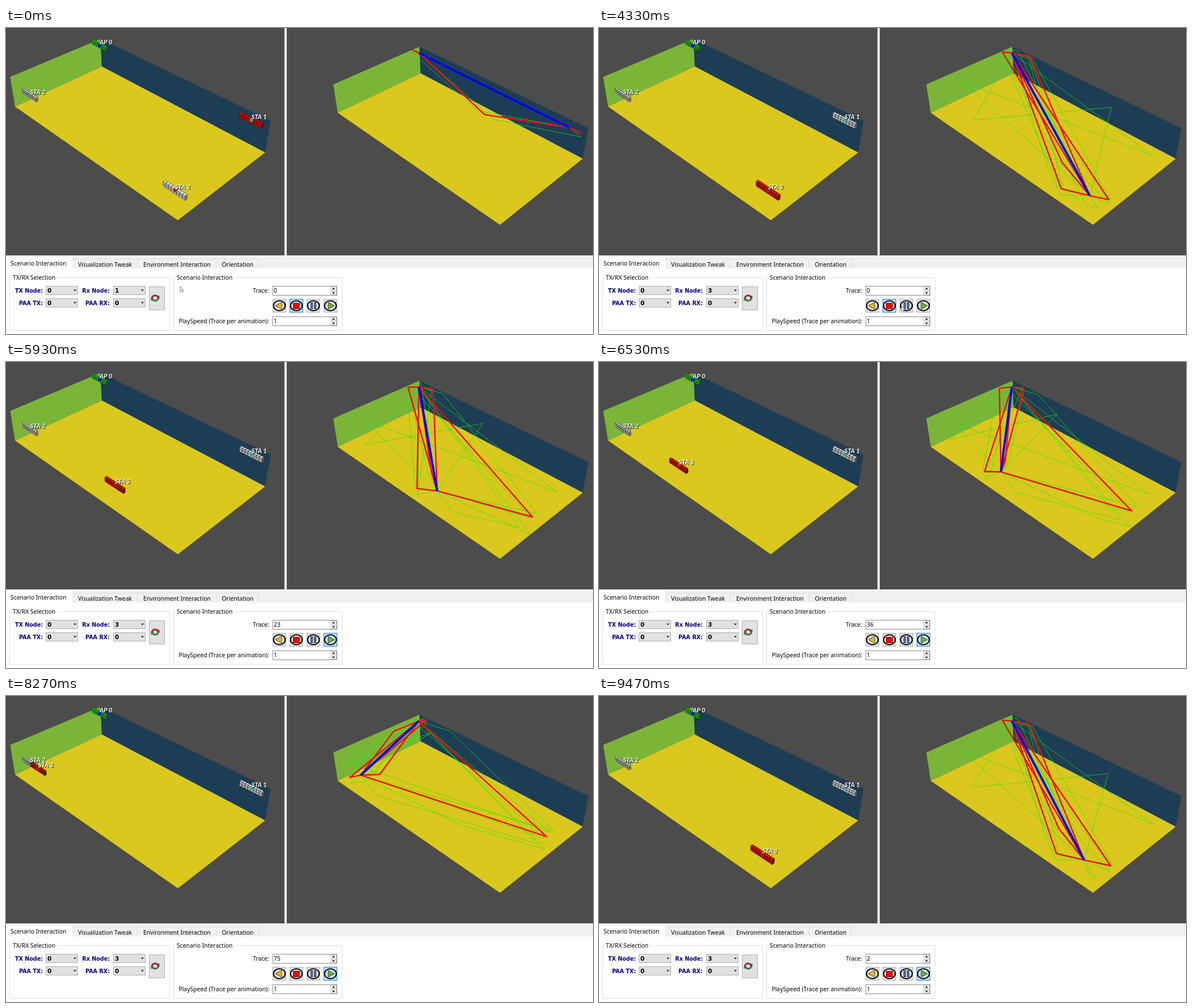
Recreate the animation shown at these times as an HTML page with a canvas. Size 1035x541 px, loop 9540 ms.

```html
<!DOCTYPE html>
<html lang="en">
<head>
<meta charset="utf-8">
<title>Ray tracing scenario viewer</title>
<style>
html, body { margin: 0; width: 100%; height: 100%; overflow: hidden; }
canvas { display: block; }
</style>
</head>
<body>
<canvas id="stage" width="1035" height="541"></canvas>
<script>
const c = document.getElementById('stage').getContext('2d');
const LOOP = 9540;
const UI = '10.4px "Noto Sans", "Open Sans", sans-serif';
const BOLD = 'bold 9.6px "DejaVu Sans", sans-serif';
const VALUE = 'bold 10.5px "DejaVu Sans", sans-serif';

// Perspective of the unit room: u along the blue wall, v along the green wall, w up.
// Rows: x numerator, y numerator, divisor.
const camera = m => p => {
  const [x, y, d] = m.map(r => r[0] + r[1] * p[0] + r[2] * p[1] + r[3] * p[2]);
  return [x / d, y / d];
};
const leftView = camera([[169, 188.31, -154.82, -7.9], [68, 104.01, 55.22, -49.3], [1, -.2181, -.1136, -.033]]);
const rightView = camera([[731, 66.82, -210.36, -26.06], [80, 101.2, 53.5, -48.1], [1, -.2155, -.11, -.033]]);

const AP = [.0485, .0905, .995], STA1 = [.945, .0925, .995], STA2 = [.052, .895, .39];
const LEFT = [0, 0], RIGHT = [0, 1], BACK = [1, 0], FRONT = [1, 1], FLOOR = [2, 0];

const lerp = (a, b, s) => a + (b - a) * s;

// Piecewise linear value from [time, value] pairs
function along(keys, t) {
  if (t <= keys[0][0]) return keys[0][1];
  for (let i = 1; i < keys.length; i++) {
    const [t0, a] = keys[i - 1], [t1, b] = keys[i];
    if (t <= t1) return lerp(a, b, (t - t0) / (t1 - t0));
  }
  return keys[keys.length - 1][1];
}

function shape(points, fill, stroke, width = 1, open) {
  c.beginPath();
  points.forEach(p => c.lineTo(p[0], p[1]));
  if (!open) c.closePath();
  if (fill) { c.fillStyle = fill; c.fill(); }
  if (stroke) { c.strokeStyle = stroke; c.lineWidth = width; c.stroke(); }
}

function box(x0, y0, x1, y1, fill, stroke) {
  if (fill) { c.fillStyle = fill; c.fillRect(x0, y0, x1 - x0, y1 - y0); }
  if (stroke) {
    c.strokeStyle = stroke; c.lineWidth = 1;
    c.strokeRect(x0 + .5, y0 + .5, x1 - x0 - 1, y1 - y0 - 1);
  }
}

function text(s, x, y, font = UI, color = '#000', align = 'left') {
  c.font = font; c.fillStyle = color; c.textAlign = align;
  c.fillText(s, x, y);
}

function room(view) {
  const quad = (pts, color) => shape(pts.map(view), color);
  quad([[0, 0, 0], [0, 1, 0], [0, 1, 1], [0, 0, 1]], '#7bb538');
  quad([[0, 0, 0], [1, 0, 0], [1, 0, 1], [0, 0, 1]], '#1d3d54');
  quad([[0, 0, 0], [1, 0, 0], [1, 1, 0], [0, 1, 0]], '#dac81e');
}

// Antenna array: a block of 8 x 2 elements
function node(pos, [face, top, side], dot) {
  const at = (i, j, d) => leftView([
    pos[0] + (i / 8 - .5) * .105, pos[1] + (d - .5) * .02, pos[2] + (j / 2 - .5) * .135]);
  const cell = (pts, color) => shape(pts.map(p => at(...p)), color, '#111', .5);
  for (let i = 0; i < 8; i++) {
    cell([[i, 2, 0], [i + 1, 2, 0], [i + 1, 2, 1], [i, 2, 1]], top);
    for (let j = 0; j < 2; j++)
      cell([[i, j, 1], [i + 1, j, 1], [i + 1, j + 1, 1], [i, j + 1, 1]], face);
  }
  for (let j = 0; j < 2; j++)
    cell([[8, j, 0], [8, j, 1], [8, j + 1, 1], [8, j + 1, 0]], side);
  if (dot) {
    const [x, y] = leftView(pos);
    shape([[x - 1, y - 4], [x + 3.5, y - 1], [x + 1, y + 4], [x - 3.5, y + 1]], dot);
  }
}

function label(s, pos) {
  const [x, y] = leftView(pos), font = 'italic bold 11px Lato, sans-serif';
  text(s, x + 1, y - 1, font, '#222');
  text(s, x, y - 2, font, '#fff');
}

// Specular path found by mirroring the sender in each plane; null when it misses the room
function reflect(tx, rx, planes) {
  const images = [tx];
  for (const [axis, value] of planes) {
    const p = [...images[images.length - 1]];
    p[axis] = 2 * value - p[axis];
    images.push(p);
  }
  const path = [rx];
  for (let i = planes.length; i > 0; i--) {
    const [axis, value] = planes[i - 1], from = path[0], image = images[i];
    const s = (value - from[axis]) / (image[axis] - from[axis]);
    const hit = from.map((a, n) => lerp(a, image[n], s));
    if (!(s > 0 && s < 1) || hit.some(a => a < -1e-6 || a > 1 + 1e-6)) return null;
    path.unshift(hit);
  }
  return [tx, ...path];
}

function rays(rx, planes) {
  const draw = (list, color, width) => {
    const path = reflect(AP, rx, list);
    if (path) shape(path.map(rightView), null, color, width, true);
  };
  c.lineJoin = 'round';
  for (const a of planes) for (const b of planes) if (a !== b) draw([a, b], 'rgba(20, 240, 10, .7)', 1);
  for (const a of planes) draw([a], '#ff0808', 2.4);
  draw([], '#0000ff', 4);
  c.lineJoin = 'miter';
}

function combo(x, y, value, hot) {
  box(x, y, x + 57, y + 16, hot ? '#e5f1fb' : '#e1e1e1', hot ? '#0078d7' : '#adadad');
  text(value, x + 3, y + 12, VALUE);
  shape([[x + 49, y + 6.5], [x + 54, y + 6.5], [x + 51.5, y + 9.5]], '#222');
}

function spin(y, value) {
  box(470, y, 584, y + 17, '#fff', '#8a8a8a');
  text(value, 472, y + 12);
  for (const [top, tip] of [[y + 1, -1], [y + 9, 1]]) {
    box(572, top, 583, top + 7, '#f0f0f0', '#c4c4c4');
    const mid = top + 3.5;
    shape([[575, mid - tip * 1.5], [580, mid - tip * 1.5], [577.5, mid + tip * 1.8]], '#222');
  }
}

function mediaButton(x, hot, icon) {
  box(x, 479, x + 24, 503, hot ? '#cce4f7' : '#e1e1e1', hot ? '#0078d7' : '#adadad');
  c.beginPath();
  c.ellipse(x + 12, 491, 10.3, 8.8, 0, 0, 7);
  c.strokeStyle = '#000'; c.lineWidth = 2; c.stroke();
  icon(x + 12);
}

function refreshButton() {
  box(252, 457, 280, 499, '#e1e1e1', '#adadad');
  for (const [color, turn] of [['#d01818', 0], ['#2f9e2f', Math.PI]]) {
    c.save();
    c.translate(263, 477.5);
    c.rotate(turn);
    for (const [stroke, width] of [['#222', 2.8], [color, 1.6]]) {
      c.beginPath();
      c.ellipse(0, 0, 5.4, 4.6, 0, Math.PI * 1.02, Math.PI * 1.8);
      c.strokeStyle = stroke; c.lineWidth = width; c.stroke();
    }
    shape([[3, -1], [7, -4.5], [7, 1]], color, '#222', .6);
    c.restore();
  }
}

function tabs() {
  box(0, 402, 1035, 425, '#f0f0f0');
  box(0, 425, 1035, 541, '#fff');
  const names = [['Visualization Tweak', 117, 232], ['Environment Interaction', 232, 371], ['Orientation', 371, 446]];
  for (const [name, x0, x1] of names) {
    box(x0 - 1, 408, x1, 426, '#f0f0f0', '#dedede');
    text(name, (x0 + x1) / 2, 422, UI, '#000', 'center');
  }
  box(0, 425, 1035, 427, '#fff');
  box(0, 405, 117, 427, '#fff');
  text('Scenario Interaction', 8, 420);
}

function group(x0, x1, title) {
  box(x0, 441, x1, 535, null, '#dfdfdf');
  c.font = UI;
  box(x0 + 4, 438, x0 + 9 + c.measureText(title).width, 446, '#fff');
  text(title, x0 + 6, 445);
}

function controls(rx, trace, hover, focus) {
  tabs();
  group(6, 289, 'TX/RX Selection');
  group(295, 593, 'Scenario Interaction');
  const names = [['TX Node:', 65, 468], ['PAA TX:', 65, 490], ['Rx Node:', 183, 468], ['PAA RX:', 183, 490]];
  for (const [s, x, y] of names) text(s, x, y, BOLD, '#000080', 'right');
  combo(70, 456, 0);
  combo(70, 478, 0);
  combo(189, 456, rx, hover === 'rx');
  combo(189, 478, 0);
  refreshButton();
  text('Trace:', 464, 468, UI, '#000', 'right');
  text('PlaySpeed (Trace per animation):', 464, 522, UI, '#000', 'right');
  spin(456, trace);
  spin(510, 1);
  const hot = name => hover === name || focus === name;
  mediaButton(470, false, x => shape([[x - 7, 491], [x + 4, 485], [x + 4, 497]], '#ffb800', '#222', .8));
  mediaButton(500, hot('stop'), x => box(x - 6, 486, x + 6, 497, '#ff0000', '#a00000'));
  mediaButton(530, false, x => {
    box(x - 5, 485, x - 1, 497, '#5578b8', '#25365c');
    box(x + 1, 485, x + 5, 497, '#5578b8', '#25365c');
  });
  mediaButton(560, hot('play'), x => shape([[x + 7, 491], [x - 4, 485], [x - 4, 497]], '#6cb52d', '#222', .8));
}

function cursor(x, y) {
  const outline = [[0, 0], [0, 9], [2, 7.2], [3.5, 10.3], [5, 9.6], [3.6, 6.6], [6.2, 6.4]];
  shape(outline.map(p => [x + p[0], y + p[1]]), '#fff', '#666', .8);
}

const GRAY = ['#b4b4b4', '#e2e2e2', '#8c8c8c'];
const RED = ['#c00808', '#e01010', '#8a0000'];
const GREEN = ['#14c814', '#28e828', '#0a8c0a'];

const SELECTIONS = [[0, 1], [870, 2], [1530, 3], [2000, 2], [2530, 1], [3070, 2], [3530, 3]];
const TRACES = [[4820, 0], [5330, 11], [6530, 36], [7200, 52], [8270, 75], [9470, 102]];
// Station 3 walks to the green wall, slowing down, and turns back
const WALK = [[0, .934], [36, .4437], [52, .245], [67.5, .042], [75, .1155], [100, .44]];

function draw(t) {
  const rx = SELECTIONS.filter(([at]) => at <= t).pop()[1];
  const trace = Math.floor(along(TRACES, t) + 1e-6) % 100;
  const stations = [null, STA1, STA2, [along(WALK, trace), .896, .39]];

  box(0, 0, 1035, 403, '#4c4c4c');
  room(leftView);
  room(rightView);
  node(AP, GREEN, '#0000e8');
  [, '#18b8a0', null, '#cc1010'].forEach((dot, i) => node(stations[i], i === rx ? RED : GRAY, dot));
  label('AP 0', AP);
  for (let i = 1; i < 4; i++) label('STA ' + i, stations[i]);

  // The wall-mounted pair is only served by the two end walls and the floor
  rays(stations[rx], rx === 1 ? [LEFT, RIGHT, FLOOR] : [LEFT, RIGHT, BACK, FRONT, FLOOR]);
  box(491, 0, 495, 403, '#f5f5f5');

  const x = along([[0, 307], [400, 209], [3730, 209], [4400, 571], [4670, 571], [5000, 562]], t);
  const y = along([[0, 457], [400, 464], [3730, 464], [4400, 494], [4670, 494], [5000, 545]], t);
  const over = x >= 189 && x < 246 && y < 473 ? 'rx' : x >= 500 && x < 524 ? 'stop' : x >= 560 && y < 503 ? 'play' : '';
  controls(rx, trace, over, t < 4670 ? 'stop' : 'play');
  if (y < 541) cursor(x, y);
}

function snap(t) {
  const start = k => Math.round(k * 20 / 3) * 10;
  let k = Math.min(142, Math.floor(t * .015) + 1);
  while (start(k) > t) k--;
  return start(k);
}

const began = performance.now();
function tick() {
  draw(snap((performance.now() - began) % LOOP));
  requestAnimationFrame(tick);
}
tick();
</script>
</body>
</html>
```
